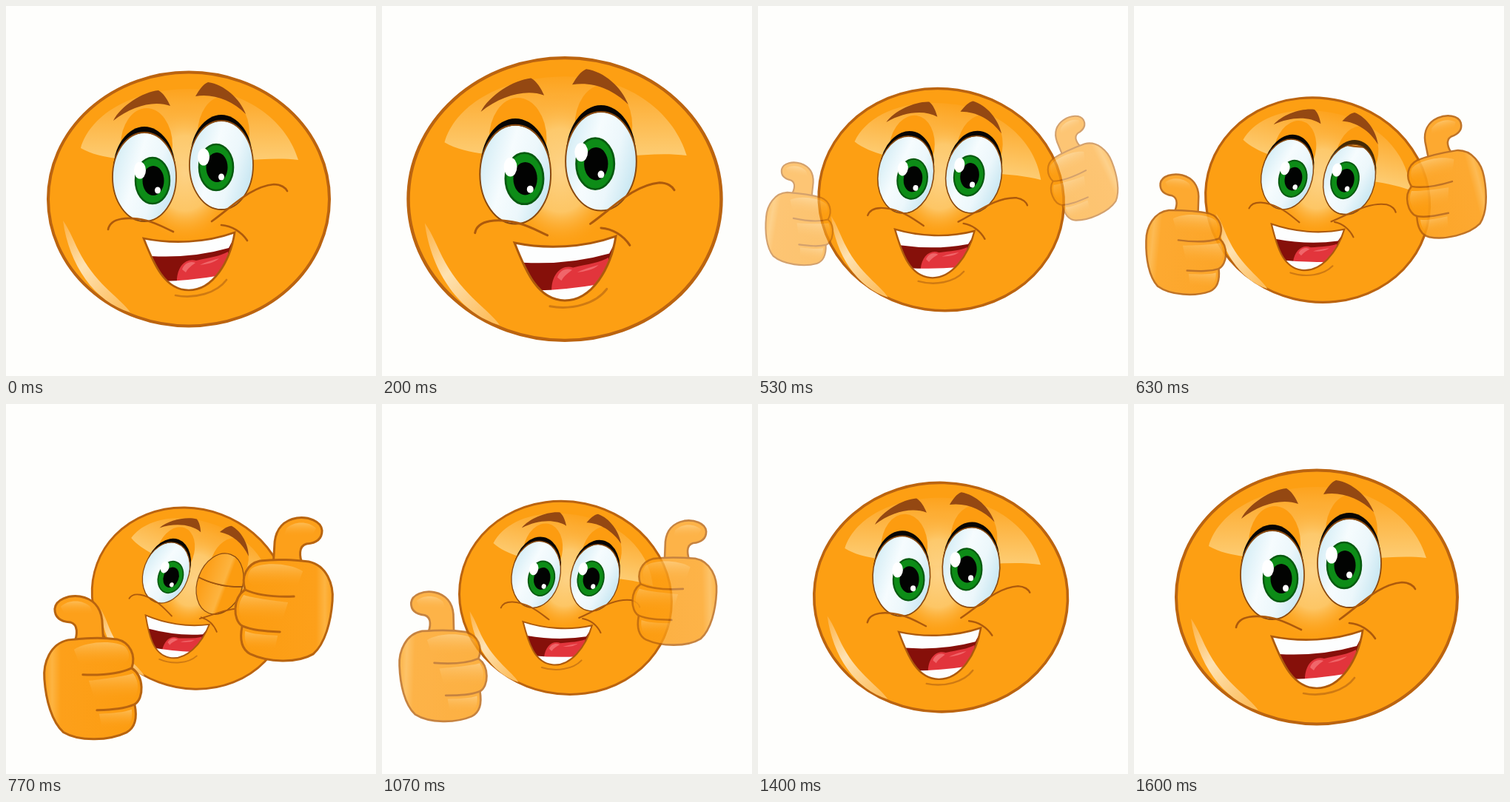
These frames come from a looping animation (500x500 px, 2000 ms). An HTML page:

```html
<!DOCTYPE html>
<html lang="en">
<head>
<meta charset="utf-8">
<title>Winking smiley</title>
<style>
  html, body { margin: 0; height: 100%; overflow: hidden; background: #fefefc; }
  svg { display: block; width: 100vw; height: 100vh; }
  .line { fill: none; stroke: #ad5a0c; stroke-width: 2.7; stroke-linecap: round; }
</style>
</head>
<body>
<svg viewBox="0 0 500 500">
  <defs>
    <linearGradient id="brow-shine" x1="0" y1="0" x2="0" y2="1">
      <stop offset="0" stop-color="#fda31e"/>
      <stop offset=".4" stop-color="#fdb544"/>
      <stop offset="1" stop-color="#fdcf78"/>
    </linearGradient>
    <radialGradient id="glow">
      <stop offset="0" stop-color="#fdd285"/>
      <stop offset=".55" stop-color="#fdca6e" stop-opacity=".9"/>
      <stop offset="1" stop-color="#fda41f" stop-opacity="0"/>
    </radialGradient>
    <linearGradient id="rim" x1="0" y1="0" x2=".8" y2="1">
      <stop offset="0" stop-color="#fdb040"/>
      <stop offset=".45" stop-color="#fee2b2"/>
      <stop offset="1" stop-color="#fdbe5e"/>
    </linearGradient>
    <linearGradient id="white" x1="0" y1=".2" x2="1" y2=".6">
      <stop offset="0" stop-color="#d0ebf4"/>
      <stop offset=".4" stop-color="#f6fcfe"/>
      <stop offset=".7" stop-color="#ecf7fb"/>
      <stop offset="1" stop-color="#c8e7f2"/>
    </linearGradient>
    <linearGradient id="skin">
      <stop offset="0" stop-color="#fda21a"/>
      <stop offset=".08" stop-color="#fdb442"/>
      <stop offset=".17" stop-color="#fda01a"/>
      <stop offset="1" stop-color="#fc9c10"/>
    </linearGradient>
    <linearGradient id="finger" x1="0" y1="0" x2="0" y2="1">
      <stop offset="0" stop-color="#fdbc55"/>
      <stop offset="1" stop-color="#fda01a" stop-opacity="0"/>
    </linearGradient>
    <linearGradient id="lid">
      <stop offset=".2" stop-color="#fda01a"/>
      <stop offset=".55" stop-color="#fdb440"/>
      <stop offset=".62" stop-color="#fc9c10"/>
    </linearGradient>
    <clipPath id="eye-clip"><ellipse cx="291" cy="215" rx="43" ry="60"/></clipPath>
    <clipPath id="mouth-clip">
      <path id="lips" d="M186 314C225 322 270 320 309 306C303 345 280 384 247 384C215 384 200 350 186 314Z"/>
    </clipPath>
    <g id="hand" stroke="#b8640f" stroke-width="3" stroke-linejoin="round" stroke-linecap="round">
      <path fill="#fda01a" d="M92 324C97 312 98 298 87 295C74 294 66 289 66 277C67 264 85 258 100 260C118 263 128 275 130 292L132 324Z"/>
      <path fill="url(#skin)" d="M84 319C60 324 50 350 52 372C54 400 62 430 78 444C100 457 140 455 163 444C174 438 178 425 174 406C187 398 187 368 170 357C176 340 168 322 150 318C125 315 104 317 84 319Z"/>
      <g stroke="none" fill="url(#finger)">
        <path d="M92 332C110 320 150 319 162 329C170 340 166 348 158 353H100Z"/>
        <path d="M112 374C140 371 164 367 172 364C181 376 180 390 172 399H120Z"/>
        <path d="M126 419C145 418 160 417 170 413C172 426 168 435 160 438H130Z"/>
        <path d="M74 274C84 264 104 264 114 274L118 285H80Z"/>
      </g>
      <path fill="none" d="M104 366C130 367 155 364 170 357M123 414C145 413 160 412 174 406"/>
    </g>
  </defs>

  <g id="face">
    <ellipse cx="247" cy="261" rx="190" ry="171.5" fill="#fd9f13" stroke="#bb6410" stroke-width="4"/>
    <path fill="url(#brow-shine)" d="M101 192C113 150 165 113 247 112C330 112 381 160 395 208C370 205 345 207 320 209L245 214L150 206C132 204 115 200 101 192Z"/>
    <path id="shine" fill="url(#rim)" d="M77 290C85 350 120 400 168 414C156 396 124 378 102 338C92 320 87 304 77 290Z"/>
    <ellipse cx="242" cy="226" rx="70" ry="92" fill="url(#glow)"/>
    <g id="eyes"></g>
    <g fill="#944812">
      <path d="M145 155C155 135 185 116 206 114C213 118 218 126 222 135C200 127 170 135 145 155Z"/>
      <path d="M256 122C262 112 266 106 273 103C295 106 316 125 324 146C305 127 280 118 256 122Z"/>
    </g>
    <path class="line" d="M138 302C141 286 165 284 190 290C205 294 215 300 226 305"/>
    <path class="line" d="M278 291C305 272 330 244 362 241C372 241 378 246 380 250"/>
    <g id="mouth">
      <g clip-path="url(#mouth-clip)">
        <path fill="#86100a" d="M180 300H315V390H180Z"/>
        <path fill="#e2353c" d="M231 372C231 352 243 340 257 344C275 340 290 338 300 332V390H231Z"/>
        <path fill="#f0666a" d="M238 356C241 347 249 344 256 347C252 350 246 354 243 360ZM262 350C272 345 282 343 288 341C282 347 270 349 262 350Z"/>
        <path fill="#fdfefe" d="M180 300H315L301 327Q252 341 196 338Z"/>
        <path fill="#fdfefe" d="M210 372Q250 371 290 364V390H210Z"/>
      </g>
      <use href="#lips" class="line"/>
      <path class="line" d="M291 296C305 297 318 305 326 317"/>
      <path class="line" style="stroke:#cf7a12" d="M229 391C255 396 285 388 298 370"/>
    </g>
  </g>

  <use id="left" href="#hand"/>
  <use id="right" href="#hand"/>
</svg>

<script>
const LOOP = 2000, STEP = 1000 / 30;
const el = id => document.getElementById(id);
const set = (id, transform) => el(id).setAttribute('transform', transform);

const ramp = (t, from, to) => Math.min(1, Math.max(0, (t - from) / (to - from)));
const mix = (a, b, p) => a + (b - a) * p;
const arc = (a, b, c, p) => a.map((v, i) => mix(mix(v, b[i], p), mix(b[i], c[i], p), p));

const oval = (x, y, rx, ry, fill, more = '') =>
  `<ellipse cx="${x}" cy="${y}" rx="${rx}" ry="${ry}" fill="${fill}" ${more}/>`;

function eye(x, y, ix, iy, lids = '') {
  return oval(x + 3, y - 43, 35, 50, '#fd9c10') +
    oval(x, y - 7, 42.5, 61, '#080503', lids && 'id="lash"') +
    oval(x, y, 43, 59.5, 'url(#white)') +
    oval(ix, iy, 23, 31, '#0d8c17', 'stroke="#075a10" stroke-width="2.5"') +
    oval(ix + 1, iy, 14.5, 20, '#020302') +
    oval(ix - 17, iy - 14, 8, 11.5, '#fff') +
    oval(ix + 7, iy + 13, 4, 4.5, '#fff') +
    lids +
    oval(x, y, 43, 60, 'none', 'stroke="#8a4a10" stroke-width="1.8"');
}

const lid = (id, far) =>
  `<path id="${id}" d="M235 ${far}H347V199Q291 226 235 215Z" fill="url(#lid)" stroke="#a0560e" stroke-width="2.5"/>`;

el('eyes').innerHTML = eye(187, 231, 198, 236) +
  eye(291, 215, 284, 218, `<g clip-path="url(#eye-clip)">${lid('lower', 350)}${lid('upper', 80)}</g>`);

// Each hand swings in along one arc, rests, and leaves along another.
const REST = { left: [118, 356], right: [375, 250] };
const HANDS = [
  { id: 'left', flip: 1, from: [85, 245], via: [18, 271], away: [55, 377], to: [96, 213], shrink: .52, tilt: 18, drift: 5 },
  { id: 'right', flip: -1, from: [418, 200], via: [463, 219], away: [388, 255], to: [451, 187], shrink: .7, tilt: -48, drift: -3 }
];

function drawHand(h, t) {
  const come = ramp(t, 333, 767), go = ramp(t, 900, 1300), rest = REST[h.id];
  const [x, y] = go ? arc(rest, h.away, h.to, go) : arc(h.from, h.via, rest, come);
  const size = mix(.45, 1, come) - h.shrink * go ** 1.9;
  const tilt = h.tilt * (1 - come) + h.drift * go;
  set(h.id, `translate(${x} ${y}) rotate(${tilt}) scale(${size * h.flip} ${size}) translate(-118 -356)`);
  el(h.id).setAttribute('opacity', Math.min(1, 1.3 * come) - go ** 1.8);
}

function drawFace(t) {
  const back = ramp(t, 900, 1600);
  const tilt = 20.5 * ramp(t, 367, 767) * (1 - back) ** 2;
  const size = t < 200 ? mix(1, 1.113, t / 200)
    : mix(mix(1.113, .705, ramp(t, 200, 767)), 1, back ** 1.2);
  const drift = .08 * tilt;
  set('face', `translate(${247 + drift} ${261 + drift}) rotate(${tilt}) scale(${size}) translate(-247 -261)`);
  set('shine', `rotate(${-.85 * tilt} 247 261)`);
  set('mouth', `translate(${-.35 * tilt} ${-.1 * tilt}) rotate(${-.42 * tilt} 247 320)`);

  const open = 1 - ramp(t, 600, 733) + ramp(t, 900, 1033);
  set('upper', `translate(0 ${-78 * open})`);
  set('lower', `translate(0 ${78 * open})`);
  el('lash').setAttribute('opacity', open);
}

function draw(t) {
  drawFace(t);
  HANDS.forEach(h => drawHand(h, t));
}

const start = performance.now();
function tick(now) {
  const t = Math.max(0, now - start) % LOOP;
  draw(Math.floor((t + 5) / STEP) * STEP);
  requestAnimationFrame(tick);
}
draw(0);
requestAnimationFrame(tick);
</script>
</body>
</html>
```
